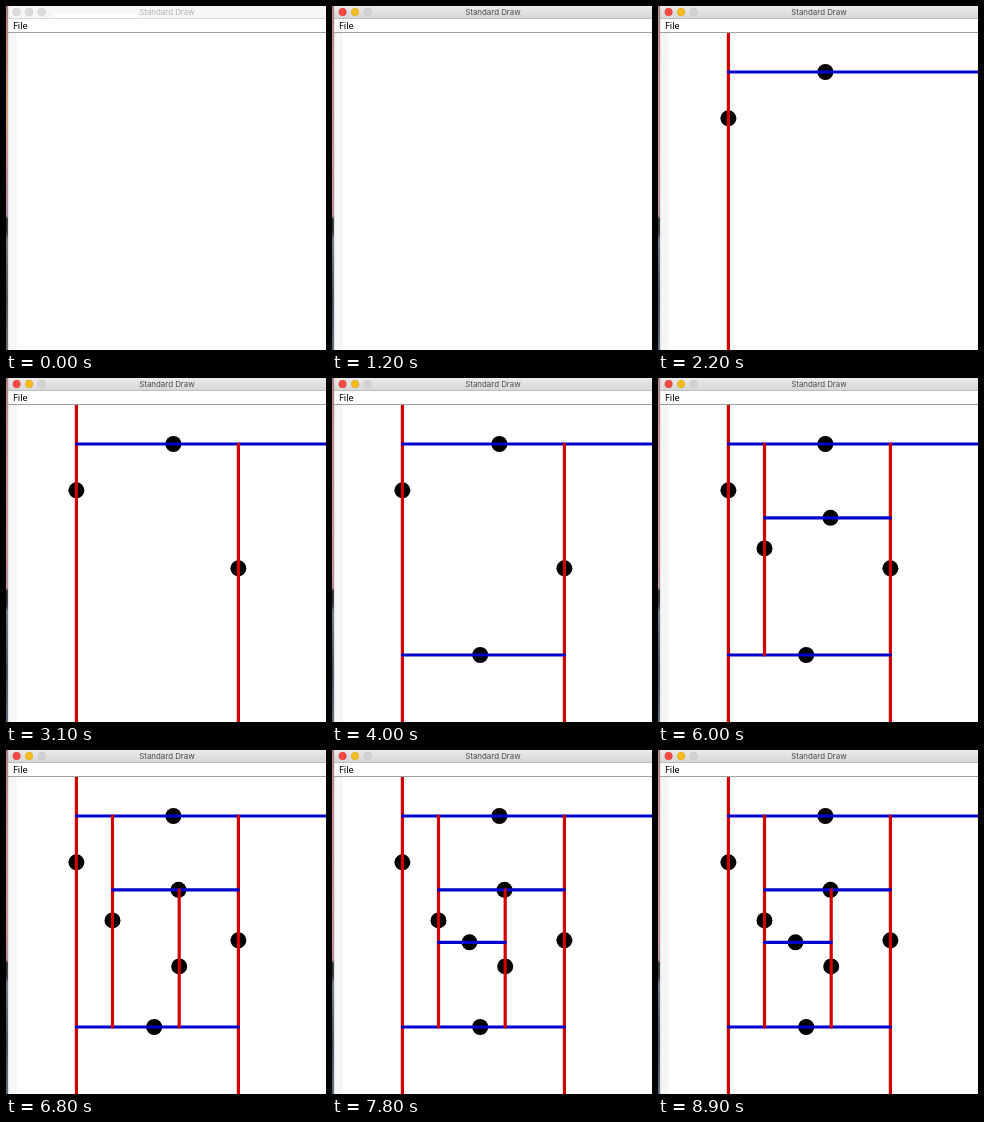
These frames come from a looping animation (320x344 px, 9 s). An HTML page:

```html
<!DOCTYPE html>
<html lang="en">
<head>
<meta charset="utf-8">
<title>Standard Draw</title>
<style>
  html, body { margin: 0; width: 100%; height: 100%; overflow: hidden; background: #fff; }
  svg { display: block; width: 320px; height: 344px; }
  .title { font: 7.9px Inter, "Open Sans", sans-serif; text-anchor: middle; }
  .menu { font: 9.2px "Noto Sans", "Open Sans", sans-serif; }
</style>
</head>
<body>
<svg viewBox="0 0 320 344" xmlns="http://www.w3.org/2000/svg">
  <defs>
    <linearGradient id="bar" x2="0" y2="1">
      <stop offset="0" stop-color="#ebebeb"/><stop offset="1" stop-color="#d6d6d6"/>
    </linearGradient>
    <linearGradient id="warm" x2="0" y2="1">
      <stop offset="0" stop-color="#a8797c"/><stop offset=".12" stop-color="#c98a72"/>
      <stop offset=".35" stop-color="#dba27c"/><stop offset=".5" stop-color="#c78aa0"/>
      <stop offset=".61" stop-color="#b58aa6"/><stop offset=".62" stop-color="#2c2a30"/>
      <stop offset=".66" stop-color="#39383e"/><stop offset=".68" stop-color="#77777b"/>
      <stop offset=".85" stop-color="#4c4d52"/><stop offset="1" stop-color="#66676b"/>
    </linearGradient>
    <linearGradient id="cool" x2="0" y2="1">
      <stop offset="0" stop-color="#b08084"/><stop offset=".15" stop-color="#cc8c8c"/>
      <stop offset=".45" stop-color="#d09498"/><stop offset=".61" stop-color="#c08c98"/>
      <stop offset=".62" stop-color="#2b2a33"/><stop offset=".66" stop-color="#35353f"/>
      <stop offset=".68" stop-color="#6d7c8c"/><stop offset=".85" stop-color="#3c4a5c"/>
      <stop offset="1" stop-color="#566a80"/>
    </linearGradient>
  </defs>

  <rect width="320" height="344" fill="#fff"/>
  <rect x="2" y="27" width="8.5" height="317" fill="#f5f5f5"/>
  <g id="plot"></g>

  <rect id="titlebar" x="1" width="319" height="12.5"/>
  <rect id="rule" x="1" y="12" width="319" height="1"/>
  <rect id="glare" x="48" y="7.5" width="84" height="4" fill="#fff"/>
  <g id="lights"></g>
  <text id="title" class="title" x="161" y="9.3">Standard Draw</text>
  <rect x="2" y="13" width="318" height="13" fill="#fff"/>
  <rect x="2" y="26" width="318" height="1" fill="#a0a0a0"/>
  <text class="menu" x="7" y="22.7">File</text>

  <rect id="desktop" width="2" height="344"/>
  <rect x="1.5" width="1" height="344" fill="#999" opacity=".45"/>
</svg>
<script>
const LOOP = 9000, CLEAN = 200, ACTIVE = 1200;
const RED = "#d00000", BLUE = "#0000cc";
const $ = id => document.getElementById(id);

// time, point x, point y, direction, line start, line end
const steps = [
  [1300, 70.4, 112.3, "v", 20, 350],
  [2200, 167.4, 66, "h", 70.4, 326],
  [3100, 232.4, 190.3, "v", 66, 350],
  [4000, 148.2, 277, "h", 70.4, 232.4],
  [5100, 106.5, 170.4, "v", 66, 277],
  [6000, 172.5, 139.8, "h", 106.5, 232.4],
  [6800, 173.2, 216.4, "v", 139.8, 277],
  [7700, 137.5, 192.3, "h", 106.5, 173.2]
];

function add(parent, tag, attrs) {
  const el = document.createElementNS("http://www.w3.org/2000/svg", tag);
  for (const key in attrs) el.setAttribute(key, attrs[key]);
  return parent.appendChild(el);
}

const nodes = steps.map(([time, x, y, dir, from, to]) => {
  const el = add($("plot"), "g", {});
  const d = dir === "v" ? `M${x} ${from}V${to}` : `M${from} ${y}H${to}`;
  add(el, "circle", { cx: x, cy: y, r: 8 });
  add(el, "path", {
    d, stroke: dir === "v" ? RED : BLUE,
    "stroke-width": 3.2, "stroke-linecap": "round"
  });
  return { time, el };
});

const lights = ["#fb4a45", "#f6bd1c", "#d2d2d2"].map((color, i) => ({
  color, el: add($("lights"), "circle", { cx: 10.6 + 12.5 * i, cy: 6, r: 3.9, "stroke-width": .5 })
}));

function draw(t) {
  const active = t >= ACTIVE;
  $("titlebar").setAttribute("fill", active ? "url(#bar)" : "#f6f6f6");
  $("rule").setAttribute("fill", active ? "#bdbdbd" : "#d9d9d9");
  $("title").setAttribute("fill", active ? "#4c4c4c" : "#b4b4b4");
  $("desktop").setAttribute("fill", t < CLEAN ? "url(#warm)" : "url(#cool)");
  $("glare").style.display = t < CLEAN ? "" : "none";
  lights.forEach(({ color, el }, i) => {
    el.setAttribute("fill", active ? color : "#dcdcdc");
    el.setAttribute("stroke", active && i < 2 ? "rgba(0,0,0,.15)" : "#c6c6c6");
  });
  for (const { time, el } of nodes) el.style.display = t >= time ? "" : "none";
}

const start = performance.now();
function tick() {
  draw((performance.now() - start) % LOOP);
  requestAnimationFrame(tick);
}
tick();
</script>
</body>
</html>
```
